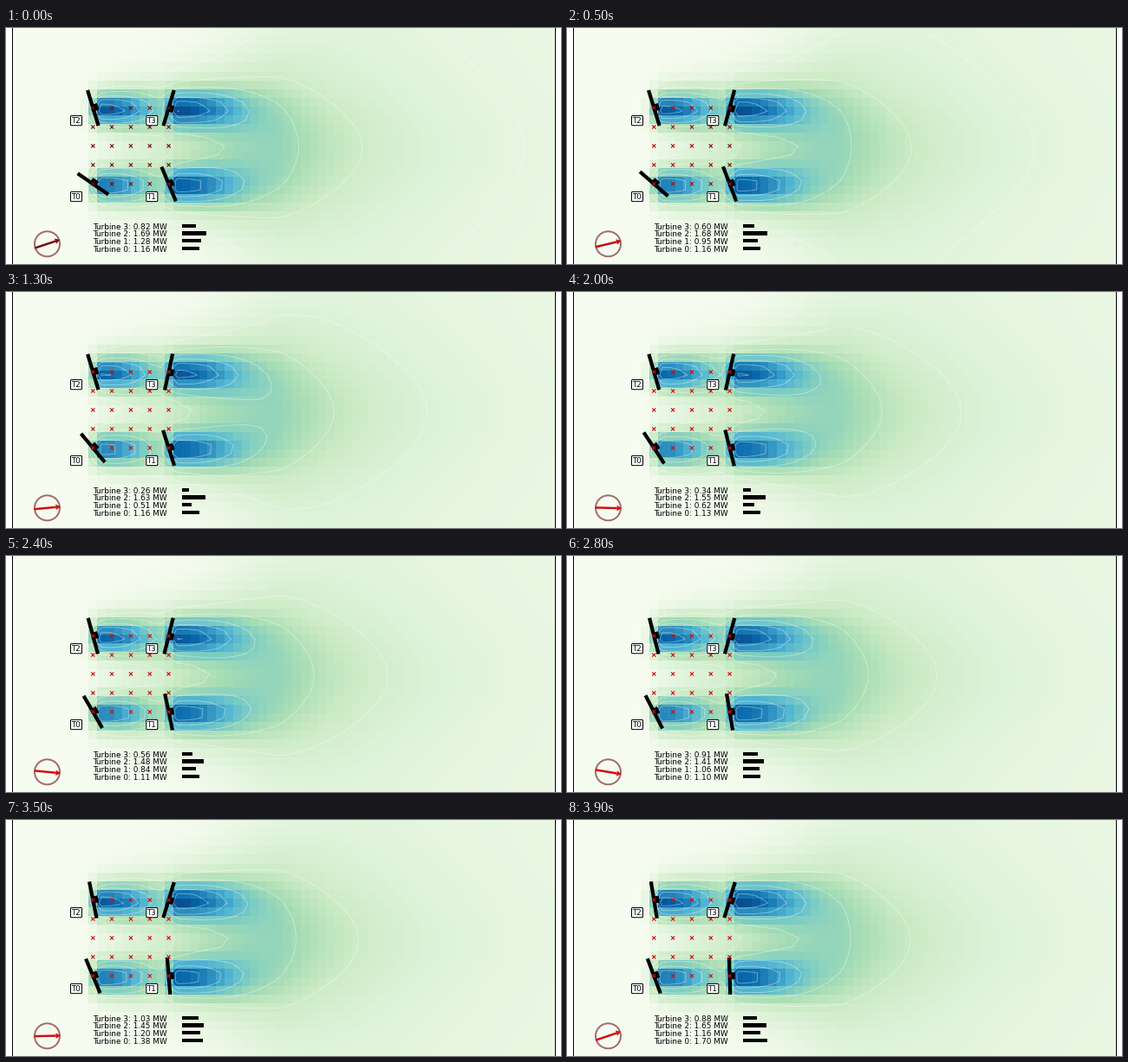
Write a matplotlib script that moves like this. It is 640 px wide and 273 px high and loops after 4000 ms.

```python
import numpy as np
import matplotlib.pyplot as plt
from matplotlib.animation import FuncAnimation
from matplotlib.patches import Circle, Polygon, Rectangle

W, H, DPI = 640, 273, 100
FRAMES, INTERVAL = 40, 100
LEFT, RIGHT = 7.2, 633.4
COLS, ROWS = 64, 27
PX = 72 / DPI  # points per pixel

GRID_X = np.linspace(100.3, 187.6, 5)
GRID_Y = np.linspace(92.5, 180.4, 5)
HUBS = [(x, y) for y in GRID_Y[[-1, 0]] for x in GRID_X[[0, -1]]]
DIAL, DIAL_R = np.array([47.5, 249.8]), 14.5


def smoothstep(u):
    u = np.clip(u, 0, 1)
    return u * u * (3 - 2 * u)


def gauss(d, sigma):
    return np.exp(-0.5 * (d / sigma) ** 2)


def rebound(t, value, end):
    """Let a drifting value swing to its end value late in the loop."""
    return value + (end - value) * smoothstep((t - 3.2) / 0.6)


def wind_angle(t):
    return rebound(t, 18.5 - 10 * t, 19)


def red(t):
    return (0.48 + 0.35 * (1 - np.exp(-3 * max(t, 0))), 0.05, 0.06)


def yaws(t):
    return (55.5 * np.exp(-t / 3.9),
            22.5 - 3 * t - 0.6 * t ** 2,
            17 - 0.13 * t ** 3,
            -14.5 + 2.5 * np.cos(np.pi * (t - 1.6) / 2))


def powers(t):
    keys = (0, 0.5, 1.3, 2, 2.4, 3.1)
    return (rebound(t, 1.16 - 0.043 * max(t - 1.3, 0), 1.70),
            rebound(t, np.interp(t, keys, (1.28, 0.95, 0.51, 0.62, 0.84, 1.23)), 1.16),
            rebound(t, 1.69 - 0.0358 * t ** 2, 1.65),
            rebound(t, np.interp(t, keys, (0.82, 0.60, 0.26, 0.34, 0.56, 1.18)), 0.88))


cell_w, cell_h = (RIGHT - LEFT) / COLS, H / ROWS
X, Y = np.meshgrid(LEFT + cell_w * (np.arange(COLS) + 0.5),
                   cell_h * (np.arange(ROWS) + 0.5))


def background():
    """Mixed flow that peaks behind the turbines and fades downstream."""
    floor = 0.072 / (1 + np.exp(-(X - 300) / 50))
    rise = smoothstep((X - 105) / 215)
    fade = np.exp(-(np.maximum(X - 314, 0) / 122) ** 1.25)
    across = 0.5 * (gauss(Y - 139, 48) + gauss(Y - 139, 0.3 * X))
    return floor + 0.36 * rise * fade * across


def wake(hub, length):
    ahead = X - hub[0] - 9
    along = gauss(ahead, length)
    along[ahead < -4.5] = 0.55
    along[ahead < -14] = 0.08
    along[ahead < -24] = 0
    width = 12.5 + 0.08 * np.maximum(ahead, 0)
    offset = Y - hub[1] - 1.7
    return along * (0.8 * gauss(offset, width) + 0.2 * gauss(offset, 1.8 * width))


BASE = background()
WAKES = [strength * wake(hub, length) for hub, strength, length in
         zip(HUBS, (0.82, 0.88, 0.91, 0.92), (50, 56, 53, 58))]


def field(t):
    swing = 1 + 0.03 * np.cos(np.pi * t / 2)
    free = 1 - BASE
    for shape in WAKES:
        free = free * (1 - swing * shape)
    return 1 - free


fig = plt.figure(figsize=(W / DPI, H / DPI), dpi=DPI, facecolor="white")
ax = fig.add_axes([0, 0, 1, 1])
ax.axis("off")

image = ax.imshow(field(0), cmap="GnBu", vmin=0, vmax=1, aspect="auto",
                  interpolation="nearest", extent=(LEFT, RIGHT, H, 0))
ax.set_xlim(0, W)
ax.set_ylim(H, 0)
ax.set_autoscale_on(False)
for x in (LEFT, RIGHT):
    ax.plot([x, x], [0, H], color="black", lw=PX, zorder=3)


def line(width, color="black"):
    return ax.plot([], [], color=color, lw=width * PX,
                   solid_capstyle="butt", zorder=4)[0]


rotors, nacelles, bars, readings = [], [], [], []
for i, (hx, hy) in enumerate(HUBS):
    rotors.append(line(4.2))
    nacelles.append(line(8))
    ax.text(hx - 19.3, hy + 14.6, f"T{i}", fontsize=6.2, ha="center",
            va="center", zorder=6,
            bbox=dict(boxstyle="round,pad=0.13", fc="white", ec="black", lw=PX))
    bars.append(ax.add_patch(Rectangle((203, 252.7 - 8.65 * i), 0, 4.3,
                                       color="black", lw=0, zorder=5)))
    readings.append(ax.text(100, 258.9 - 8.7 * i, "", fontsize=6.4,
                            va="baseline", zorder=5))

mesh_x, mesh_y = np.meshgrid(GRID_X, GRID_Y)
sensors = ax.scatter(mesh_x, mesh_y, marker="x", s=9, linewidths=0.8,
                     color="darkred", zorder=5)
lags = np.tile(0.12 * np.arange(5), 5)

ax.add_patch(Circle(DIAL, DIAL_R, fill=False, ec="#a06e6c", lw=2 * PX, zorder=4))
shaft = line(2.5)
head = ax.add_patch(Polygon([(0, 0)] * 3, lw=0, zorder=5))
contours = None


def draw_turbine(i, yaw, power):
    hx, hy = HUBS[i]
    s, c = np.sin(np.radians(yaw)), np.cos(np.radians(yaw))
    ends = np.array([-21.5, 21.5])
    rotors[i].set_data(hx + ends * s, hy + ends * c)
    nacelles[i].set_data([hx, hx + 6 * c], [hy, hy - 6 * s])
    readings[i].set_text(f"Turbine {i}: {power:.2f} MW")
    bars[i].set_width(4 + 14.2 * power)


def draw_wind(t):
    angle = np.radians(wind_angle(t))
    along = np.array([np.cos(angle), -np.sin(angle)])
    across = np.array([-along[1], along[0]])
    tail, neck, tip = (DIAL + d * along for d in (-15, 10, 15.5))
    shaft.set_data(*zip(tail, neck))
    head.set_xy([tip, neck + 3.2 * across, neck - 3.2 * across])
    shaft.set_color(red(t))
    head.set_facecolor(red(t))
    sensors.set_color([red(t - lag) for lag in lags])


def update(n):
    global contours
    t = n * INTERVAL / 1000
    values = field(t)
    image.set_data(values)
    if contours is not None:
        contours.remove()
    levels = 0.236 + 0.144 * (np.arange(-1, 6) + t / 3.35)
    contours = ax.contour(X, Y, values, levels=levels[levels < 0.99],
                          colors="white", alpha=0.4, linewidths=0.65, zorder=2)
    for i, (yaw, power) in enumerate(zip(yaws(t), powers(t))):
        draw_turbine(i, yaw, power)
    draw_wind(t)
    return []


anim = FuncAnimation(fig, update, frames=FRAMES, interval=INTERVAL,
                     repeat=True, repeat_delay=0, blit=False)
plt.show()
```
